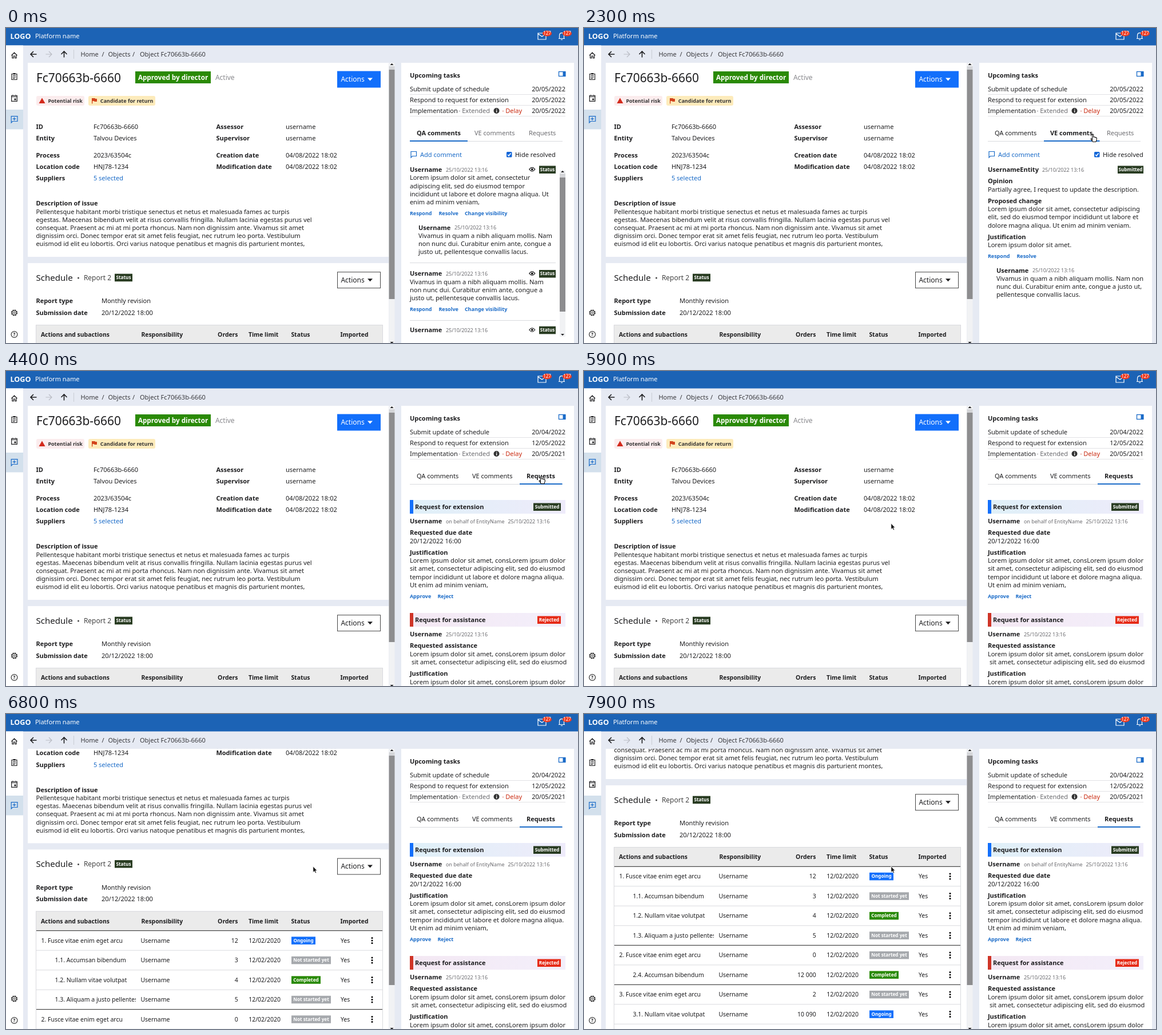
These frames come from a looping animation (1000x552 px, 8000 ms). An HTML page:

```html
<!DOCTYPE html>
<html lang="en">
<head>
<meta charset="utf-8">
<title>Object detail</title>
<style>
html, body { margin: 0; width: 100%; height: 100%; overflow: hidden; background: #e6eaf3; }
svg { display: block; width: 1000px; height: 552px; font-family: "Noto Sans", sans-serif; }
</style>
</head>
<body>
<svg id="stage" viewBox="0 0 1000 552"></svg>
<script>
const INK = '#1d1d1f', GREY = '#6a6a6e', LINK = '#1a6bc8', BLUE = '#126ffb',
  GREEN = '#2a8a06', DARK = '#293c22', RED = '#e62b17', MUTED = '#a6a9ad', LINE = '#d9dade';

// Text is placed by the middle of its capitals.
function text(x, y, str, { size = 11.05, weight = 400, fill = INK, anchor = 'start' } = {}) {
  const left = anchor === 'start' ? x - 0.6 : x;
  return `<text x="${left}" y="${y + size * 0.36}" font-size="${size}" font-weight="${weight}" fill="${fill}" text-anchor="${anchor}">${str}</text>`;
}
const bold = (x, y, str, opt) => text(x, y, str, { size: 11, weight: 700, ...opt });
const small = (x, y, str) => text(x, y, str, { size: 9, fill: GREY });
const link = (x, y, str) => text(x, y, str, { size: 9, weight: 600, fill: LINK });
const lines = (x, y, rows) => rows.map((row, i) => text(x, y + i * 14.2, row)).join('');
const rect = (x, y, w, h, fill, more = '') =>
  `<rect x="${x}" y="${y}" width="${w}" height="${h}" fill="${fill}" ${more}/>`;
const path = (d, stroke = INK, more = '') =>
  `<path d="${d}" fill="none" stroke="${stroke}" stroke-width="1.2" ${more}/>`;
const shape = (d, fill = INK) => `<path d="${d}" fill="${fill}"/>`;
const rule = (x1, x2, y, color = LINE) => path(`M${x1} ${y}H${x2}`, color, 'style="stroke-width:1"');
const at = (x, y, body) => `<g transform="translate(${x} ${y})">${body}</g>`;
const badge = (x, y, w, str, fill, size = 8.2) => rect(x, y - 6.5, w, 13.5, fill) +
  text(x + w / 2, y, str, { size, weight: 700, fill: '#fff', anchor: 'middle' });

function frame() {
  const count = x => `<ellipse cx="${x}" cy="9.5" rx="8" ry="5" fill="#ee3a1f"/>` +
    text(x, 9.5, '127', { size: 8, fill: '#fff', anchor: 'middle' });
  const icons =
    at(14.5, 48, path('M-5 0L0-4.8L5 0M-3.6-1V4.7H-1.2V1H1.2V4.7H3.6V-1')) +
    at(14.5, 85, path('M-4.5-4.5H4.5V5.5H-4.5ZM-2.5-1.5H2.5M-2.5 1H2.5M-2.5 3.4H1') + rect(-2, -6, 4, 2.5, INK)) +
    at(14.5, 123, path('M-4.8-4.5H4.8V5.3H-4.8ZM-4.8-2.5H4.8M-2.6-6V-4M2.6-6V-4', INK) + rect(0, 0.5, 3, 3, INK)) +
    at(14.5, 160, path('M-5.3 6V-5.3H5.5V3.5H-3ZM0-3.5V2M-2.8-.8H2.8', LINK)) +
    at(14.5, 499, '<circle r="4.6" fill="none" stroke="#333" stroke-width="2" stroke-dasharray="2.4 1.2"/>' +
      '<circle r="3.9" fill="none" stroke="#333"/><circle r="1.6" fill="none" stroke="#333"/>') +
    at(14.5, 537, '<circle r="5.4" fill="none" stroke="#333" stroke-width="1.2"/>' +
      text(0, 0, '?', { size: 8, weight: 600, anchor: 'middle' }));
  const arrow = 'M5.5 0H-5M0-5L-5 0L0 5';
  return rect(0, 0, 1000, 30.5, '#1c63b5') +
    text(8, 14.5, 'LOGO', { size: 12.6, weight: 700, fill: '#fff' }) +
    text(51.5, 14.5, 'Platform name', { fill: '#fff' }) +
    path('M930 9H944V20H930ZM930 10L937 15L944 10', '#fff') + count(946) +
    path('M966 18.5H977M967.5 18V13.5C967.5 7 975.5 7 975.5 13.5V18M970 20.5H973', '#fff') + count(981) +
    rect(0, 30.5, 30, 522, '#fff') + rect(0, 143, 30, 34.5, '#d3e0ec') + icons +
    at(48, 46, path(arrow, INK, 'style="stroke-width:1.6"')) +
    at(75, 46, path(arrow, '#b9bcc4', 'transform="scale(-1 1)"')) +
    at(101.5, 46, path(arrow, INK, 'transform="rotate(90)" style="stroke-width:1.6"')) +
    path('M118.5 38V54', '#cdd0d8') +
    [[131, 'Home'], [168, '/'], [179, 'Objects'], [221.5, '/'], [234.5, 'Object Fc70663b-6660']]
      .map(([x, s]) => text(x, 46, s, { fill: '#38383c' })).join('');
}

function button(y, fill, ink, border) {
  return rect(579.5, y - 14, 75, 28, fill, `stroke="${border}"`) +
    text(586, y, 'Actions', { size: 12, fill: ink }) +
    shape(`M632 ${y - 2.5}H641L636.5 ${y + 2.5}Z`, ink);
}

function table() {
  const top = 520, head = 34.3, step = 34.5;
  const status = {
    o: ['Ongoing', BLUE, 42], n: ['Not started yet', MUTED, 69], c: ['Completed', GREEN, 51]
  };
  const rows = [
    ['1. Fusce vitae enim eget arcu', '12', 'o'], ['1.1. Accumsan bibendum', '3', 'n'],
    ['1.2. Nullam vitae volutpat', '4', 'c'], ['1.3. Aliquam a justo pellentesque', '5', 'n'],
    ['2. Fusce vitae enim eget arcu', '0', 'n'], ['2.4. Accumsan bibendum', '12 000', 'c'],
    ['3. Fusce vitae enim eget arcu', '2', 'n'], ['3.1. Nullam vitae volutpat', '10 090', 'o']
  ];
  const th = (x, s, anchor) => text(x, top + 17.5, s, { size: 10.4, weight: 600, anchor });
  const td = (x, y, s, anchor) => text(x, y, s, { size: 10.5, anchor });
  return rect(52, top, 607, head, '#ebebeb') +
    th(61.5, 'Actions and subactions') + th(237, 'Responsibility') + th(405.5, 'Orders', 'end') +
    th(424.5, 'Time limit') + th(499, 'Status') + th(585, 'Imported') +
    rows.map(([name, orders, key], i) => {
      const edge = top + head + i * step, y = edge + 17.3, [label, fill, w] = status[key];
      const sub = /^\d\.\d/.test(name);
      return rule(52, 659, edge, sub ? LINE : '#222') +
        `<g clip-path="url(#name)">${td(sub ? 86 : 62, y, name)}</g>` +
        td(236, y, 'Username') + td(405.8, y, orders, 'end') + td(424.8, y, '12/02/2020') +
        badge(499, y - 0.2, w, label, fill) + td(585.5, y, 'Yes') +
        [-4.5, 0, 4.5].map(d => `<circle cx="640" cy="${y + d}" r="1.5"/>`).join('');
    }).join('') + rule(52, 659, top + head + rows.length * step) +
    rect(52.5, top + 0.5, 606, 400, 'none', `stroke="${LINE}"`);
}

function page() {
  const fields = [
    [173, 'ID', 'Fc70663b-6660', 'Assessor', 'username'],
    [193.5, 'Entity', 'Talvou Devices', 'Supervisor', 'username'],
    [222.7, 'Process', '2023/63504c', 'Creation date', '04/08/2022 18:02'],
    [243, 'Location code', 'HNJ78-1234', 'Modification date', '04/08/2022 18:02']
  ];
  return rect(38, 61, 631, 340, '#fff') + rect(38, 412, 631, 500, '#fff') +
    text(53.5, 87.5, 'Fc70663b-6660', { size: 20.9, weight: 500 }) +
    rect(226, 76, 132, 21, GREEN) +
    text(231.5, 86.5, 'Approved by director', { size: 11.7, weight: 600, fill: '#fff' }) +
    text(366.5, 86.5, 'Active', { size: 12, fill: '#8a8a8e' }) + button(90, BLUE, '#fff', BLUE) +
    rect(53, 119, 84, 17, '#fbeced', 'rx="3"') + shape('M57.5 132L63 122.5L68.5 132Z', '#d32a1c') +
    text(74, 127.7, 'Potential risk', { size: 9, weight: 600, fill: '#333' }) +
    rect(144, 119, 117, 17, '#fdebbb', 'rx="3"') +
    shape('M150 123H156L155.5 124H159V129H154.5L154 128H151.3V132.5H150Z', '#d3441c') +
    text(165.3, 127.7, 'Candidate for return', { size: 9, weight: 600, fill: '#333' }) +
    fields.map(([y, a, b, c, d]) => bold(53, y, a) + text(153.5, y, b) + bold(368, y, c) + text(489.5, y, d)).join('') +
    bold(53, 263.3, 'Suppliers') + text(153.5, 263.3, '5 selected', { fill: LINK }) +
    bold(53, 307.3, 'Description of issue') +
    lines(53, 321.7, [
      'Pellentesque habitant morbi tristique senectus et netus et malesuada fames ac turpis',
      'egestas. Maecenas bibendum velit at risus convallis fringilla. Nullam lacinia egestas purus vel',
      'consequat. Praesent ac mi at mi porta rhoncus. Nam non dignissim ante. Vivamus sit amet',
      'dignissim orci. Donec tempor erat sit amet felis feugiat, nec rutrum leo porta. Vestibulum',
      'euismod id elit eu lobortis. Orci varius natoque penatibus et magnis dis parturient montes,'
    ]) +
    text(53, 437.5, 'Schedule', { size: 15.1, weight: 500 }) +
    '<circle cx="126.5" cy="438" r="1.5" fill="#444"/>' +
    text(136.5, 437.5, 'Report 2', { size: 12, fill: '#444' }) + badge(190, 437.2, 31, 'Status', DARK) +
    button(441.7, '#fff', INK, '#444') +
    bold(53, 478.5, 'Report type') + text(167.5, 478.5, 'Monthly revision') +
    bold(53, 498.7, 'Submission date') + text(167.5, 498.7, '20/12/2022 18:00') + table();
}

function scrollbar(x, top, bottom, thumbTop, thumbEnd) {
  const mid = x + 5;
  return rect(x, top, 10, bottom - top, '#f1f2f4') + rect(x, top + 6, 10, thumbTop - top - 6, '#d4d5d8') +
    rect(x, thumbTop, 10, thumbEnd - thumbTop, '#8d8d8f') +
    shape(`M${mid - 3} ${top + 4}H${mid + 3}L${mid} ${top + 1}Z`) +
    shape(`M${mid - 3} ${bottom - 5}H${mid + 3}L${mid} ${bottom - 2}Z`);
}

function tasks(tab) {
  const dates = tab < 2 ? Array(3).fill('20/05/2022') : ['20/04/2022', '12/05/2022', '20/05/2021'];
  return bold(706.5, 83.3, 'Upcoming tasks') +
    rect(966.5, 76.5, 11, 8, '#fff', `stroke="${LINK}" stroke-width="1.3"`) + rect(973.5, 76, 5, 9, LINK) +
    ['Submit update of schedule', 'Respond to request for extension', 'Implementation'].map((s, i) => {
      const y = [107, 126, 145.3][i];
      return text(706.5, y, s) + text(978, y, dates[i], { anchor: 'end' }) + rule(706, 978, [116.5, 135.5, 154.5][i], '#e2e2e5');
    }).join('') +
    text(792, 145.3, '· Extended', { fill: GREY }) +
    '<circle cx="857.5" cy="145" r="5" fill="#333"/>' + rect(857, 144, 1.3, 4, '#fff') + rect(857, 141.7, 1.3, 1.4, '#fff') +
    text(868, 145.3, '· Delay', { fill: '#c9290f' });
}

function tabs(active) {
  const xs = [[718.5, 819.5, 914.5], [718.5, 815.5, 914.5], [718.5, 815.5, 910.5]][active];
  const [from, to] = [[706, 807], [804, 901.5], [898, 972.5]][active];
  return rule(706, 973, 198.5) + rect(from, 197, to - from, 2, LINK) +
    ['QA comments', 'VE comments', 'Requests'].map((s, i) =>
      i === active ? bold(xs[i], 184.5, s) : text(xs[i], 184.5, s, { fill: i > active ? GREY : INK })).join('');
}

function commentBar(x) {
  return path('M708 216.5H717.5V224.5H710.5L708 227Z', LINK) + text(724.5, 222, 'Add comment', { fill: LINK }) +
    rect(x, 217, 9.5, 9.5, '#1266d8', 'rx="1.5"') +
    path(`M${x + 2} 222L${x + 4} 224L${x + 7.5} 219.5`, '#fff', 'style="stroke-width:1.5"') +
    text(x + 15.5, 222, 'Hide resolved');
}

function byline(x, y, name, dateX) {
  return bold(x, y, name) + small(dateX, y + 0.3, '25/10/2022 13:16');
}

function qaView() {
  const actions = y => link(706.5, y, 'Respond') + link(757, y, 'Resolve') + link(802.5, y, 'Change visibility');
  const post = y => byline(706.5, y, 'Username', 769.5) + badge(932, y, 29, 'Status', DARK, 8) +
    at(919.8, y - 0.3, path('M-5 0Q0-6.5 5 0Q0 6.5-5 0Z') + '<circle r="1.8"/>');
  const mollis = ['Vivamus in quam a nibh aliquam mollis. Nam'];
  return commentBar(875) + post(248) +
    lines(706.5, 262.5, ['Lorem ipsum dolor sit amet, consectetur', 'adipiscing elit, sed do eiusmod tempor',
      'incididunt ut labore et dolore magna aliqua. Ut', 'enim ad minim veniam,']) + actions(324.6) +
    byline(721.5, 349.7, 'Username', 784.5) +
    lines(721.5, 363.7, [...mollis, 'non nunc dui. Curabitur enim ante, congue a', 'justo ut, pellentesque convallis lacus.']) +
    rule(706, 961, 411.5) + post(430.5) +
    lines(706.5, 444.7, [...mollis, 'non nunc dui. Curabitur enim ante, congue a', 'justo ut, pellentesque convallis lacus.']) +
    actions(492.6) + rule(706, 961, 512.5) + post(529.3) + scrollbar(968, 249, 541, 262, 497);
}

function veView() {
  return commentBar(892) + byline(706.5, 248, 'UsernameEntity', 801.5) + badge(933, 248, 45, 'Submitted', DARK, 8) +
    bold(706.5, 268.5, 'Opinion') + text(706.5, 283, 'Partially agree, I request to update the description.') +
    bold(706.5, 303, 'Proposed change') +
    lines(706.5, 317.3, ['Lorem ipsum dolor sit amet, consectetur adipiscing', 'elit, sed do eiusmod tempor incididunt ut labore et',
      'dolore magna aliqua. Ut enim ad minim veniam.']) +
    bold(706.5, 366, 'Justification') + text(706.5, 380.3, 'Lorem ipsum dolor sit amet.') +
    link(706.5, 399.7, 'Respond') + link(757, 399.7, 'Resolve') + byline(721.5, 424.7, 'Username', 784.5) +
    lines(721.5, 438.8, ['Vivamus in quam a nibh aliquam mollis. Nam non', 'nunc dui. Curabitur enim ante, congue a justo ut,',
      'pellentesque convallis lacus.']);
}

function requestView() {
  const head = (y, s, fill, bar) => rect(706, y - 12, 272, 24, fill) + rect(706, y - 12, 6, 24, bar) + bold(715.5, y, s);
  return head(238, 'Request for extension', 'url(#cool)', BLUE) + badge(922, 238, 48, 'Submitted', DARK) +
    byline(706.5, 263.5, 'Username', 878) + small(769.5, 263.8, 'on behalf of EntityName') +
    bold(706.5, 283.5, 'Requested due date') + text(706.5, 297.7, '20/12/2022 16:00') +
    bold(706.5, 318, 'Justification') +
    lines(706.5, 332.3, ['Lorem ipsum dolor sit amet, consLorem ipsum dolor', 'sit amet, consectetur adipiscing elit, sed do eiusmod',
      'tempor incididunt ut labore et dolore magna aliqua.', 'Ut enim ad minim veniam,']) +
    link(706.5, 394.5, 'Approve') + link(755, 394.5, 'Reject') +
    head(436, 'Request for assistance', 'url(#warm)', '#cf3426') + badge(929, 436, 41, 'Rejected', RED) +
    byline(706.5, 461.3, 'Username', 769.5) + bold(706.5, 481.5, 'Requested assistance') +
    text(706.5, 496, 'Lorem ipsum dolor sit amet, consLorem ipsum dolor') +
    text(709.5, 510.2, 'sit amet, consectetur adipiscing elit, sed do eiusmod') +
    bold(706.5, 530.5, 'Justification') + text(706.5, 545, 'Lorem ipsum dolor sit amet, consLorem ipsum dolor');
}

const gradient = (id, a, b) =>
  `<linearGradient id="${id}"><stop stop-color="${a}"/><stop offset="1" stop-color="${b}"/></linearGradient>`;
const stage = document.getElementById('stage');
stage.innerHTML = `<defs><clipPath id="main">${rect(38, 61, 631, 491, '#000')}</clipPath>
  <clipPath id="name">${rect(52, 500, 175, 400, '#000')}</clipPath>
  ${gradient('cool', '#dff0f8', '#eeebfa')}${gradient('warm', '#f4e8f3', '#f3effb')}</defs>` +
  frame() + `<g clip-path="url(#main)"><g id="page">${page()}</g></g>` + scrollbar(669.5, 61, 555, 73, 475) +
  rect(691, 61, 302, 491, '#fff') +
  [qaView, veView, requestView].map((view, i) => `<g class="view">${tasks(i)}${tabs(i)}${view()}</g>`).join('') +
  `<g id="cursor"><path id="arrow" d="M0 0V10.5L2.4 8.4L4 12L5.8 11.2L4.2 7.7H7.3Z" fill="#111" stroke="#fff" stroke-width=".8"/>
  <path id="hand" d="M-1.5 6V-4.5Q-.4-6.5.7-4.5V-.3Q1.9-1.3 2.8 0Q4-.7 4.6.7Q6-.2 6.3 1.5V4L5 8H-.5L-4 3.2Q-3.8 1.5-1.5 3.5" fill="#fff" stroke="#111" stroke-width="1.1" transform="translate(0 -.5)"/></g>`;

const views = [...stage.querySelectorAll('.view')];
const [pageEl, cursor, arrowEl, handEl] = ['page', 'cursor', 'arrow', 'hand'].map(id => document.getElementById(id));
const show = (el, on) => el.setAttribute('display', on ? 'inline' : 'none');

// Piecewise motion through [time, ...values] keys.
function track(keys, t, ease = u => u) {
  const i = keys.findIndex(k => k[0] > t);
  if (i === 0) return keys[0].slice(1);
  if (i < 0) return keys[keys.length - 1].slice(1);
  const [a, b] = [keys[i - 1], keys[i]], u = ease((t - a[0]) / (b[0] - a[0]));
  return a.slice(1).map((v, j) => v + (b[j + 1] - v) * u);
}
const smooth = u => u * u * (3 - 2 * u);
const pointer = [[900, 1010, 330], [1500, 890, 192], [3100, 890, 192], [3500, 926, 189.5],
  [3700, 936, 190], [4700, 936, 190], [5500, 536.8, 267]];
const scroll = [[6500, 0], [6600, 21.7], [6700, 98], [6800, 174.6], [6900, 224], [7000, 257],
  [7100, 275], [7200, 283], [7300, 287]];

function draw(now) {
  const t = Math.floor(now % 8000 / 100) * 100;
  const tab = t < 1800 ? 0 : t < 3700 ? 1 : 2;
  views.forEach((view, i) => show(view, i === tab));
  pageEl.setAttribute('transform', `translate(0 ${-track(scroll, t)[0]})`);
  const [x, y] = track(pointer, t, smooth);
  const hand = t >= 1400 && t < 3300 || t >= 3600 && t < 4900;
  cursor.setAttribute('transform', `translate(${x} ${y})`);
  show(handEl, hand);
  show(arrowEl, !hand);
  requestAnimationFrame(draw);
}
requestAnimationFrame(draw);
</script>
</body>
</html>
```
